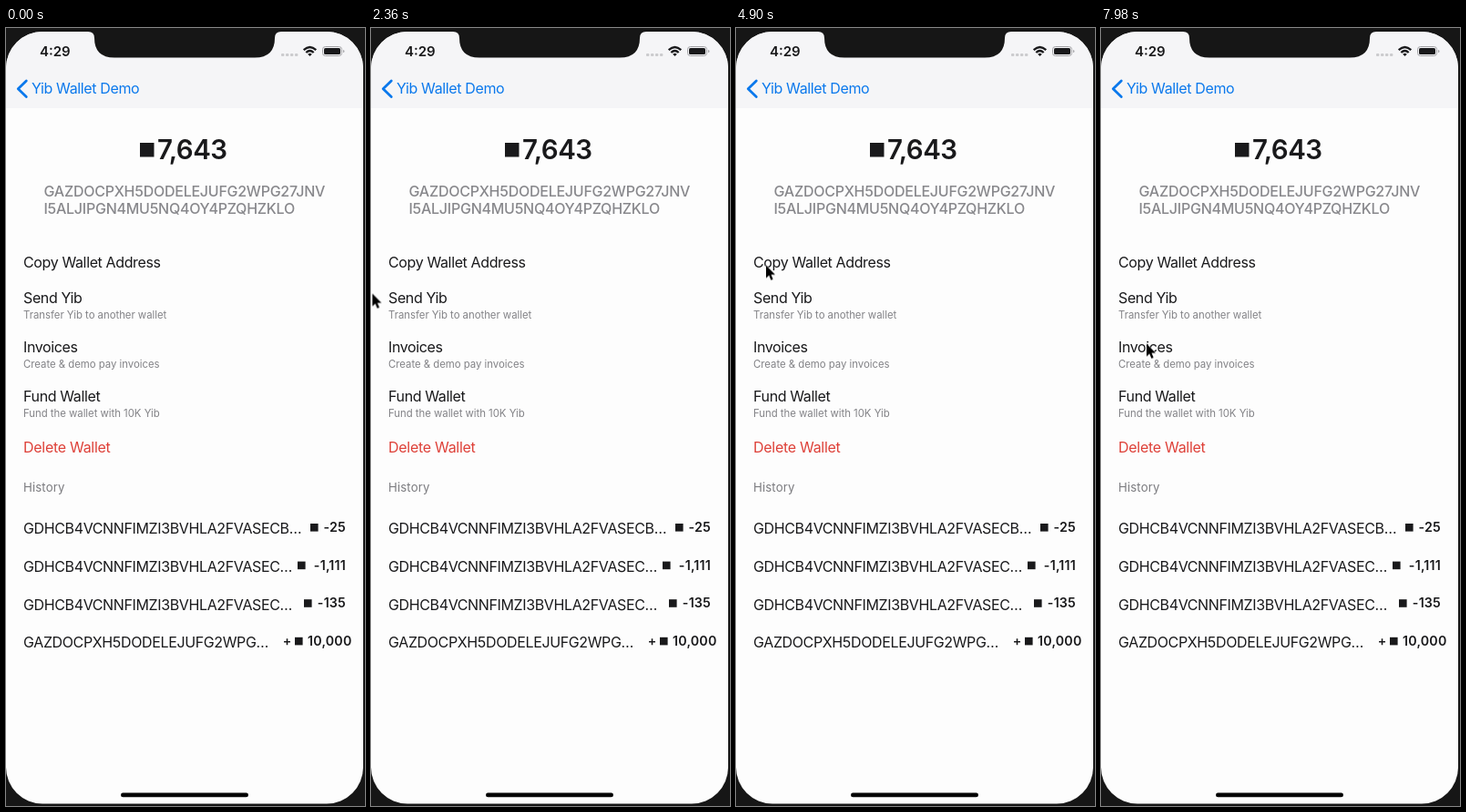
An HTML page that plays this animation: 394x854 px, repeating every 8 s.

```html
<!DOCTYPE html>
<html lang="en">
<head>
<meta charset="utf-8">
<title>Wallet demo</title>
<style>
  html, body { margin: 0; width: 100%; height: 100%; overflow: hidden; background: #161616; }
  svg { display: block; width: 394px; height: 854px; }
  text { font: 400 16px Inter, Roboto, sans-serif; letter-spacing: -.023em; fill: #19191b; }
  .nav { fill: #0a78ec; }
  .time { font-size: 15px; font-weight: 600; letter-spacing: 0; }
  .total { font-size: 29.5px; font-weight: 600; letter-spacing: -.018em; }
  .address { font-weight: 500; letter-spacing: -.016em; fill: #88888c; }
  .note { font-size: 11.4px; letter-spacing: -.003em; fill: #838387; }
  .heading { font-size: 13.2px; letter-spacing: .01em; fill: #7b7b7f; }
  .danger { letter-spacing: -.018em; fill: #de4038; }
  .amount { font-size: 14.2px; font-weight: 600; letter-spacing: .015em; text-anchor: end; }
</style>
</head>
<body>
<svg viewBox="0 0 394 854">
  <defs>
    <clipPath id="screen"><rect x="0" y="4" width="392" height="847.5" rx="40"/></clipPath>
  </defs>
  <rect width="394" height="854" fill="#161616"/>
  <g clip-path="url(#screen)">
    <rect width="394" height="854" fill="#fdfdfd"/>
    <rect width="394" height="88" fill="#f5f5f7"/>
  </g>
  <path fill="#161616" d="M90 3V4Q97 4 97 11Q97 32.5 119 32.5H273Q295 32.5 295 11Q295 4 302 4V3Z"/>

  <g fill="#cbcbce">
    <rect x="302" y="28" width="3.4" height="3" rx="1"/>
    <rect x="307" y="28" width="3.4" height="3" rx="1"/>
    <rect x="312" y="28" width="3.4" height="3" rx="1"/>
    <rect x="317" y="28" width="3.4" height="3" rx="1"/>
  </g>
  <g fill="none" stroke="#19191b" stroke-width="2.3">
    <path d="M326.7 24.2Q333.5 17.9 340.3 24.2"/>
    <path d="M329.3 27Q333.5 23.1 337.7 27"/>
  </g>
  <path d="M331.2 28.7Q333.5 26.8 335.8 28.7L333.5 31Z" fill="#19191b"/>
  <rect x="347.5" y="20.5" width="21" height="10" rx="3" fill="none" stroke="#a2a2a5"/>
  <rect x="349" y="22" width="18" height="7" rx="1.6" fill="#19191b"/>
  <path d="M370 23.7Q373 25.5 370 27.3Z" fill="#a2a2a5"/>

  <path d="M22.3 58L13.3 66.8L22.3 75.6" fill="none" stroke="#0a78ec" stroke-width="2.8" stroke-linecap="round" stroke-linejoin="round"/>
  <g id="labels"></g>
  <rect x="126" y="839.5" width="140" height="4.8" rx="2.4" fill="#060606"/>
  <path id="cursor" d="M0 0V14L3.2 11.1L5.4 16.2L7.7 15.2L5.5 10.2H10Z" fill="#000" stroke="#fff" stroke-width="1" stroke-linejoin="round" paint-order="stroke"/>
</svg>
<script>
const NS = "http://www.w3.org/2000/svg";
const labels = document.getElementById("labels");

function add(tag, attributes, content = "") {
  const node = document.createElementNS(NS, tag);
  for (const [key, value] of Object.entries(attributes)) node.setAttribute(key, value);
  node.textContent = content;
  labels.append(node);
}
const write = (x, y, content, style = "") => add("text", { x, y, class: style }, content);
const coin = (x, y, size) => add("rect", { x, y, width: size, height: size, fill: "#19191b" });

write(37, 30.8, "4:29", "time");
write(28, 72.3, "Yib Wallet Demo", "nav");
coin(147, 126, 15.5);
write(166, 144, "7,643", "total");
write(41.5, 185.3, "GAZDOCPXH5DODELEJUFG2WPG27JNV", "address");
write(41.5, 204.3, "I5ALJIPGN4MU5NQ4OY4PZQHZKLO", "address");

write(19, 262.8, "Copy Wallet Address");
[
  ["Send Yib", "Transfer Yib to another wallet"],
  ["Invoices", "Create & demo pay invoices"],
  ["Fund Wallet", "Fund the wallet with 10K Yib"]
].forEach(([title, note], i) => {
  write(19, 301.8 + i * 54, title);
  write(19, 319 + i * 54, note, "note");
});
write(19, 466.3, "Delete Wallet", "danger");
write(19, 509.4, "History", "heading");

[
  ["GDHCB4VCNNFIMZI3BVHLA2FVASECB…", "-25", 334, 373],
  ["GDHCB4VCNNFIMZI3BVHLA2FVASEC…", "-1,111", 320, 373],
  ["GDHCB4VCNNFIMZI3BVHLA2FVASEC…", "-135", 327, 373],
  ["GAZDOCPXH5DODELEJUFG2WPG…", "10,000", 317, 379.5]
].forEach(([account, amount, coinX, right], i) => {
  const y = 555.4 + i * 41.6;
  write(19, y, account);
  coin(coinX, y - 11.4, 8.6);
  write(right, y - 2.5, amount, "amount");
});
write(313.5, 677.7, "+", "amount");

// Pointer path: time in ms, x, y
const LOOP = 8000;
const path = [
  [0, -20, 291.5], [2270, -20, 291.5], [2350, 1.5, 291.5], [2400, 1.5, 291.5], [2540, -20, 293],
  [4560, -20, 269], [4700, 8, 272], [4860, 33, 260.5], [5080, 33, 260.5],
  [5300, 42, 307], [5560, 50, 342.5], [7560, 50, 342.5], [7760, 50, 346.5], [LOOP, 50, 346.5]
];
document.getElementById("cursor").animate(
  path.map(([time, x, y]) => ({ offset: time / LOOP, transform: `translate(${x}px, ${y}px)` })),
  { duration: LOOP, iterations: Infinity }
);
</script>
</body>
</html>
```
